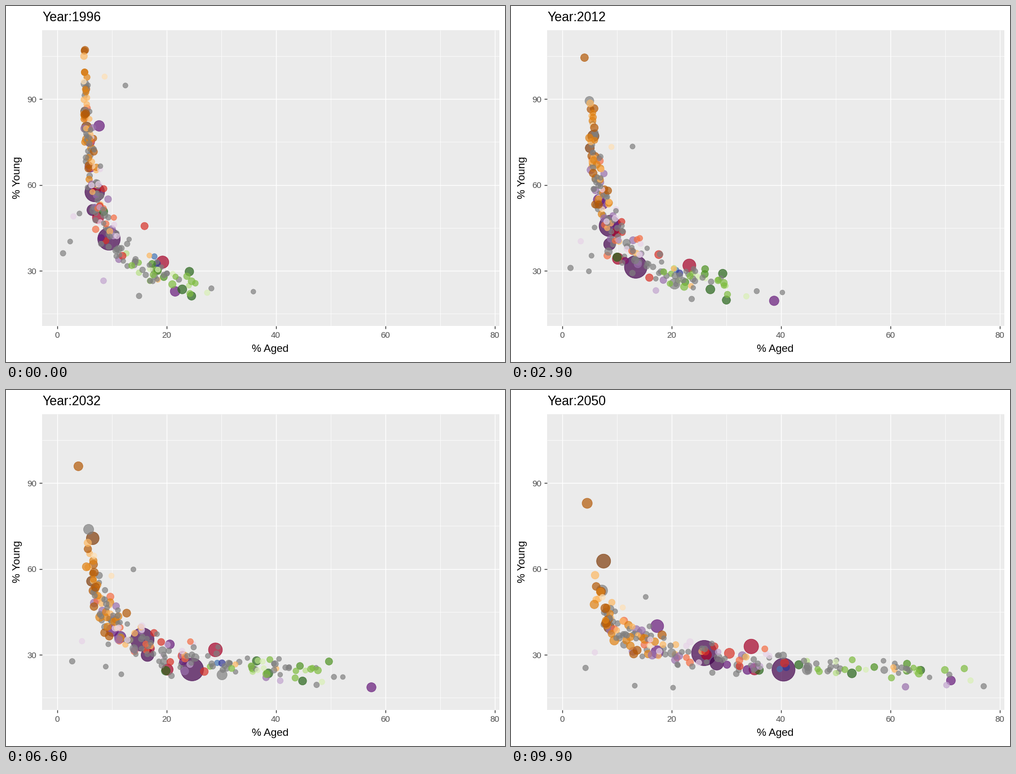
These frames come from a looping animation (885 px wide and 632 px high, 10 s). A matplotlib script:

```python
import matplotlib.pyplot as plt
import numpy as np
from matplotlib.animation import FuncAnimation
from matplotlib.colors import to_rgba
from matplotlib.patches import Rectangle

W, H, DPI = 885, 632, 100
FRAMES, INTERVAL = 100, 100
PX = 72 / DPI
FIRST, LAST, MIDDLE = 1996, 2050, 2020

GREY = "#7f7f7f"
BROWN, RUST, ORANGE, PEACH, CREAM = "#7f3b08", "#b35806", "#e08214", "#fdb863", "#fee0b6"
PLUM, VIOLET, LILAC, MAUVE, PALE = "#40004b", "#65197a", "#9970ab", "#c2a5cf", "#e7d4e8"
CRIMSON, RED, CORAL = "#a50026", "#d73027", "#f46d43"
PINE, LEAF, LIME, MINT, MIST = "#276419", "#4d9221", "#7fbc41", "#b8e186", "#d9f0b5"
BLUE, INDIGO = "#4575b4", "#313695"

rng = np.random.default_rng(12)
t = np.linspace(0, 1, FRAMES)
slow_start, fast_start = t ** 1.6, t ** 0.6


def px(x):
    return 90.5 + 9.7 * np.asarray(x)


def py(y):
    return 470 - 5.083 * (np.asarray(y) - 30)


def bubble(colour, r0, r1, aged, young):
    path = np.column_stack([px(aged), py(young)])
    return path, r0 + (r1 - r0) * t, to_rgba(colour, 0.7)


def arc(colour, r0, r1, *pts):
    """Smooth curve through the first, middle and last year's (aged, young)."""
    mid = (MIDDLE - FIRST) / (LAST - FIRST)
    coef = np.polyfit([0, mid, 1], pts, 2)
    return bubble(colour, r0, r1, np.polyval(coef[:, 0], t), np.polyval(coef[:, 1], t))


def stray(colour, r, start, end):
    """Ageing gathers pace while the share of young falls early."""
    return bubble(colour, r, r, start[0] + (end[0] - start[0]) * slow_start,
                  start[1] + (end[1] - start[1]) * fast_start)


def band(u):
    """Path of a place at development level u, from 0 to 1."""
    before = 2.1 * 10 ** (u ** 1.6)
    after = 2.9 * 19.7 ** (1 - (1 - u) ** 1.5)
    lead = before + (after - before) * slow_start
    young = 18 + 4.5 * t + (170 - 70 * t * (1 - u) ** 2) / lead
    return lead, young


def wobble(size):
    a, b = rng.normal(0, size, 2)
    return np.exp(0.85 * a + 0.5 * b * np.sin(5 * t + rng.uniform(0, 2 * np.pi)))


def swarm(count, lo, hi, r0, r1, *shades):
    """Bubbles spread along the band between two development levels."""
    for k in range(count):
        lead, young = band(lo + (hi - lo) * (k + rng.uniform()) / count)
        scale = rng.uniform(0.9, 1.12)
        yield bubble(shades[rng.integers(len(shades))], r0 * scale, r1 * scale,
                     2.9 + lead * wobble(0.17), young * wobble(0.085))


bubbles = [
    arc(PLUM, 20, 20.5, (9.5, 41.1), (17.2, 27.9), (40.5, 24.8)),
    arc(PLUM, 17.5, 22.5, (6.9, 57.5), (10.9, 40.8), (26, 30.6)),
    arc(CRIMSON, 11, 13, (19.3, 33), (25.5, 31.6), (34.6, 32.9)),
    arc(VIOLET, 8.7, 8, (21.6, 22.8), (46.8, 18.7), (71.1, 21)),
    arc(RUST, 6, 9, (5, 106.8), (3.9, 101.7), (4.6, 82.9)),
    arc(BROWN, 9, 12.5, (5.4, 80.2), (6, 74.8), (7.6, 62.7)),
    arc(GREY, 7, 10, (5.1, 95.3), (5.2, 84.1), (7.3, 52.4)),
    arc(BROWN, 7.5, 9.5, (5.1, 85.7), (5.4, 66), (8.6, 39.6)),
    arc(PLUM, 10, 12, (6.5, 51.2), (11.2, 34.7), (28.3, 27)),
    arc(VIOLET, 9.5, 11.5, (7.7, 80.6), (7.5, 45.9), (17.4, 40)),
    arc(VIOLET, 8.5, 11, (6, 75), (8.8, 44.9), (17.4, 31)),
    arc(CRIMSON, 10, 10, (7.5, 48.5), (13.4, 29.2), (35.2, 24.9)),
    arc(CRIMSON, 8, 9, (7.2, 58.5), (12.3, 37.7), (26.4, 30)),
    arc(GREY, 10, 8.5, (18.1, 30.6), (23.6, 23.9), (44.8, 24.7)),
    arc(PINE, 7.5, 7, (24.6, 21.2), (35, 19.8), (65.6, 24.6)),
    arc(PINE, 7.7, 7.5, (24.2, 29.7), (32.2, 28.6), (43.3, 26.5)),
    arc(PINE, 7.5, 8, (8.5, 50.7), (13, 29.2), (36, 24.7)),
    arc(RED, 6.5, 9, (16, 45.6), (19.4, 32.3), (30.6, 30.5)),
    stray(VIOLET, 8, (6.1, 66), (33.9, 24.7)),
    stray(PINE, 8, (22.9, 23.5), (53, 23.5)),
    stray(BLUE, 5, (17.8, 35), (39.8, 25)),
    stray(INDIGO, 6, (18.3, 32.4), (41, 25.6)),
    stray(GREY, 4.3, (35.9, 22.7), (67.2, 22.1)),
    stray(GREY, 5, (1.1, 36.1), (4.3, 25.4)),
    stray(GREY, 4.5, (2.4, 40.2), (20.3, 18.5)),
    stray(GREY, 4.5, (4.1, 50), (13.3, 19.2)),
    stray(GREY, 5, (15, 21.2), (77.1, 19)),
    stray(GREY, 4.5, (12.5, 94.7), (15.3, 50.2)),
    stray(PALE, 5, (3, 49), (6, 30.8)),
    stray(MAUVE, 5.3, (8.5, 26.5), (70.3, 19.4)),
    stray(LILAC, 6, (11.3, 34), (62.8, 18.8)),
    stray(CREAM, 4.8, (8.7, 97.8), (11.1, 46.5)),
]
small = [
    *swarm(76, 0.1, 1, 4.6, 4.7, GREY),
    *swarm(9, 0.1, 1, 6, 6.8, GREY),
    *swarm(16, 0, 0.42, 6.2, 7.3, RUST, RUST, ORANGE),
    *swarm(13, 0, 0.36, 5.5, 6.2, ORANGE, PEACH),
    *swarm(11, 0.1, 0.5, 4.9, 5.2, PEACH, CREAM),
    *swarm(4, 0.5, 0.95, 4.9, 5.2, PEACH),
    *swarm(9, 0.2, 0.7, 5.5, 6, CORAL),
    *swarm(4, 0.45, 0.8, 6, 6.8, RED),
    *swarm(10, 0.18, 0.65, 6, 7, LILAC, LILAC, VIOLET),
    *swarm(10, 0.3, 0.75, 5, 5.3, MAUVE, PALE),
    *swarm(9, 0.86, 1, 6, 6, LEAF, LIME),
    *swarm(12, 0.78, 1, 5, 5, LIME, MINT, MIST),
]
bubbles += [small[k] for k in rng.permutation(len(small))]
paths, radii, colours = zip(*bubbles)
paths, radii = np.array(paths), np.array(radii)

fig = plt.figure(figsize=(W / DPI, H / DPI), dpi=DPI, facecolor="white")
ax = fig.add_axes([0, 0, 1, 1])
ax.set(xlim=(0, W), ylim=(H, 0))
ax.axis("off")
ax.add_patch(Rectangle((64, 43), 811, 525, facecolor="#ebebeb", lw=0, zorder=0))


def line(x, y, width, colour="white"):
    ax.plot(x, y, color=colour, lw=width * PX, solid_capstyle="butt", zorder=1)


def label(x, y, text, size, colour="black", **kw):
    return ax.text(x, y, text, fontsize=size * PX, color=colour,
                   fontfamily="Liberation Sans", **kw)


for v in range(0, 81, 10):
    major = v % 20 == 0
    line([px(v)] * 2, [43, 568], 1.4 if major else 0.7)
    if major:
        line([px(v)] * 2, [568, 573], 1.4, "#333333")
        label(px(v), 589, str(v), 15, "#4d4d4d", ha="center")
for v in range(15, 106, 15):
    major = v % 30 == 0
    line([64, 875], [py(v)] * 2, 1.4 if major else 0.7)
    if major:
        line([59, 64], [py(v)] * 2, 1.4, "#333333")
        label(54.5, py(v) + 5.5, str(v), 15, "#4d4d4d", ha="right")

label(469, 614, "% Aged", 19, ha="center")
label(29, 305, "% Young", 19, ha="right", va="center", rotation=90)
title = label(64, 27, "", 23)

dots = ax.scatter(paths[:, 0, 0], paths[:, 0, 1], c=colours, edgecolors=colours,
                  linewidths=0.9 * PX, zorder=3)


def update(i):
    title.set_text(f"Year:{round(FIRST + (LAST - FIRST) * t[i])}")
    dots.set_offsets(paths[:, i])
    dots.set_sizes((2 * radii[:, i] * PX) ** 2)
    return title, dots


anim = FuncAnimation(fig, update, frames=FRAMES, interval=INTERVAL, repeat=True,
                     repeat_delay=0, blit=False)
plt.show()
```
